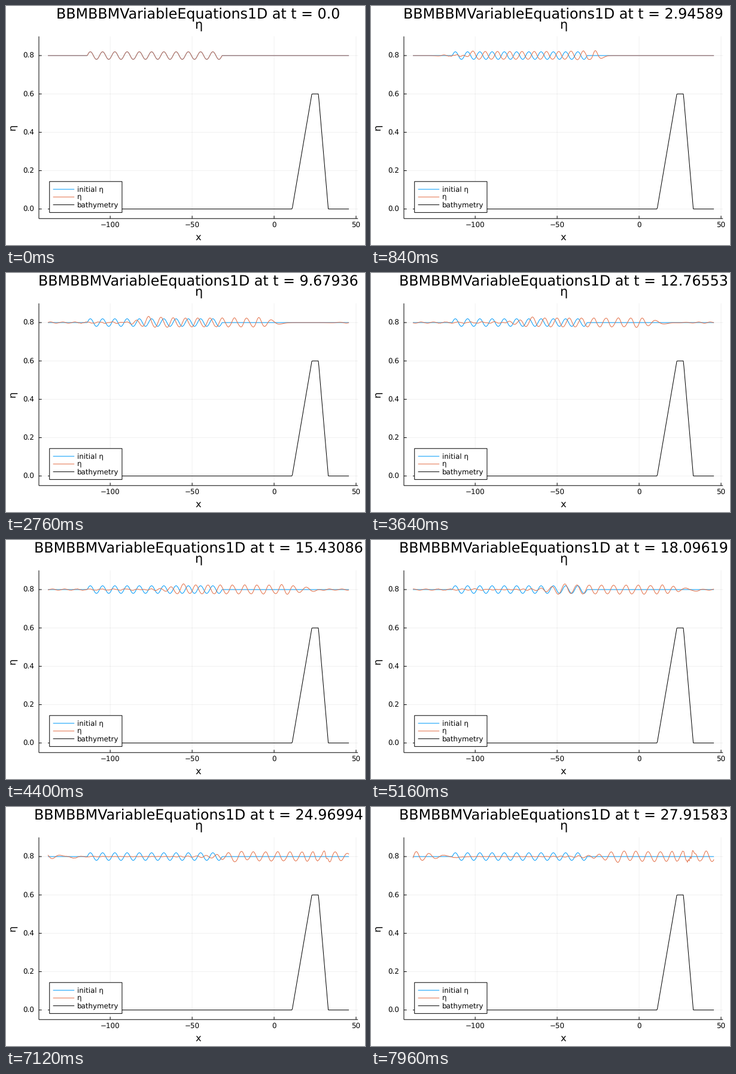
A matplotlib script that plays this animation: 600 by 400 pixels, repeating every 8 s.

```python
import matplotlib.pyplot as plt
import numpy as np
from matplotlib.animation import FuncAnimation
from matplotlib.patches import Rectangle

W, H, DPI = 600, 400, 100
PX = 72 / DPI                   # one pixel in points
FRAMES, INTERVAL = 200, 40
STEP = 70 / 499                 # simulated time per frame
SUBSTEPS = 4
LEFT, RIGHT, TOP, BOTTOM = 54.97, 588.19, 50.87, 355.8
BLUE, ORANGE = "#009AFA", "#E36F47"
FONT_SCALE = 1.0667

plt.rcParams.update({
    "font.family": "DejaVu Sans",
    "text.hinting": "none",
    "path.snap": False,
    "path.simplify": False,
    "lines.solid_capstyle": "butt",
    "lines.linewidth": PX,
})

# --- wave model: dispersive shallow water over a trapezoidal bar ---
N, X_MIN, X_MAX = 512, -138.0, 46.0
DX = (X_MAX - X_MIN) / N
G, DEPTH, AMP, K = 9.81, 0.8, 0.02, 0.8406220896381442
x = X_MIN + DX * np.arange(N)
bed = np.interp(x, [11.01, 23.04, 27.04, 33.07], [0, 0.6, 0.6, 0])
still = DEPTH - bed


def stencil(weights):
    """Periodic matrix from {offset: weight}."""
    eye = np.eye(N)
    return sum(w * np.roll(eye, o, axis=1) for o, w in weights.items())


def simulate():
    d1 = stencil({-2: 1 / 12, -1: -2 / 3, 1: 2 / 3, 2: -1 / 12}) / DX
    d2 = stencil({-2: -1 / 12, -1: 4 / 3, 0: -5 / 2, 1: 4 / 3, 2: -1 / 12}) / DX**2
    sq = np.diag(still**2)
    eye = np.eye(N)
    op_eta = np.linalg.solve(eye - d1 @ sq @ d1 / 6, d1)
    op_v = np.linalg.solve(eye - d2 @ sq / 6, d1)

    def rate(q):
        eta, v = q
        return np.array([-op_eta @ ((eta + still) * v),
                         -op_v @ (G * eta + v**2 / 2)])

    inside = (x >= -30.5 * np.pi / K) & (x <= -8.5 * np.pi / K)
    wave = np.where(inside, AMP * np.cos(K * x), 0)
    speed = np.sqrt(G / K * np.tanh(K * DEPTH))
    q = np.array([DEPTH + wave, speed * wave / DEPTH])
    states = [q[0]]
    dt = STEP / SUBSTEPS
    for _ in range(FRAMES - 1):
        for _ in range(SUBSTEPS):
            k1 = rate(q)
            k2 = rate(q + dt / 2 * k1)
            k3 = rate(q + dt / 2 * k2)
            k4 = rate(q + dt * k3)
            q = q + dt / 6 * (k1 + 2 * k2 + 2 * k3 + k4)
        states.append(q[0])
    return states


surface = simulate()

# --- figure ---
fig = plt.figure(figsize=(W / DPI, H / DPI), dpi=DPI, facecolor="white")


def pixel_axes(zorder):
    """Transparent layer measured in pixels, y pointing down."""
    layer = fig.add_axes([0, 0, 1, 1], zorder=zorder)
    layer.set(xlim=(0, W), ylim=(H, 0))
    layer.axis("off")
    return layer


def label(px, py, text, size, ha="center", **kw):
    return fig.text(px / W, 1 - py / H, text, fontsize=size * FONT_SCALE,
                    ha=ha, va="baseline", **kw)


back, front = pixel_axes(0), pixel_axes(2)
ax = fig.add_axes([LEFT / W, 1 - BOTTOM / H, (RIGHT - LEFT) / W, (BOTTOM - TOP) / H],
                  zorder=1)
pad = 0.03 * (x[-1] - x[0])
x_lo, x_hi = x[0] - pad, x[-1] + pad
y_lo, y_hi = -0.05, 0.9
ax.set(xlim=(x_lo, x_hi), ylim=(y_lo, y_hi))
ax.axis("off")

# grid, axes and ticks
TICK = 4.72
grid = dict(color="black", alpha=0.06, lw=PX)
for value in (-100, -50, 0, 50):
    px = LEFT + (value - x_lo) / (x_hi - x_lo) * (RIGHT - LEFT)
    back.plot([px, px], [TOP, BOTTOM], **grid)
    back.plot([px, px], [BOTTOM, BOTTOM - TICK], color="black")
    label(px, 370.6, str(value).replace("-", "\u2212"), 8)
for value in (0.0, 0.2, 0.4, 0.6, 0.8):
    py = BOTTOM - (value - y_lo) / (y_hi - y_lo) * (BOTTOM - TOP)
    back.plot([LEFT, RIGHT], [py, py], **grid)
    back.plot([LEFT, LEFT + TICK], [py, py], color="black")
    label(46.9, py + 4.2, f"{value:.1f}", 8, ha="right")
back.plot([LEFT, LEFT], [TOP, BOTTOM], color="black")
back.plot([LEFT, RIGHT], [BOTTOM, BOTTOM], color="black")

# curves
ax.plot(x, surface[0], color=BLUE)
eta_line, = ax.plot(x, surface[0], color=ORANGE)
ax.plot(x, bed, color="black")

# legend
BOX_X, BOX_Y, BOX_W, ROW = 72.74, 293.79, 121.2, 12.96
front.add_patch(Rectangle((BOX_X, BOX_Y), BOX_W, 4 * ROW,
                          facecolor="white", edgecolor="black", lw=PX))
entries = [("initial η", BLUE), ("η", ORANGE), ("bathymetry", "black")]
for i, (name, color) in enumerate(entries, 1):
    py = BOX_Y + i * ROW
    front.plot([78.67, 114.22], [py, py], color=color)
    front.text(119, py + 4.2, name, fontsize=8 * FONT_SCALE, va="baseline")

# titles
MID_X, MID_Y = (LEFT + RIGHT) / 2, (TOP + BOTTOM) / 2
label(MID_X, 392, "x", 11)
label(16, MID_Y, "η", 11, rotation=90, rotation_mode="anchor")
label(MID_X, 38.14, "η", 14)
title = label(MID_X, 20.74, "", 16)


def update(n):
    eta_line.set_ydata(surface[n])
    title.set_text(f"BBMBBMVariableEquations1D at t = {round(n * STEP, 5)}")
    return eta_line, title


anim = FuncAnimation(fig, update, frames=FRAMES, interval=INTERVAL,
                     repeat=True, repeat_delay=0, blit=False)
plt.show()
```
